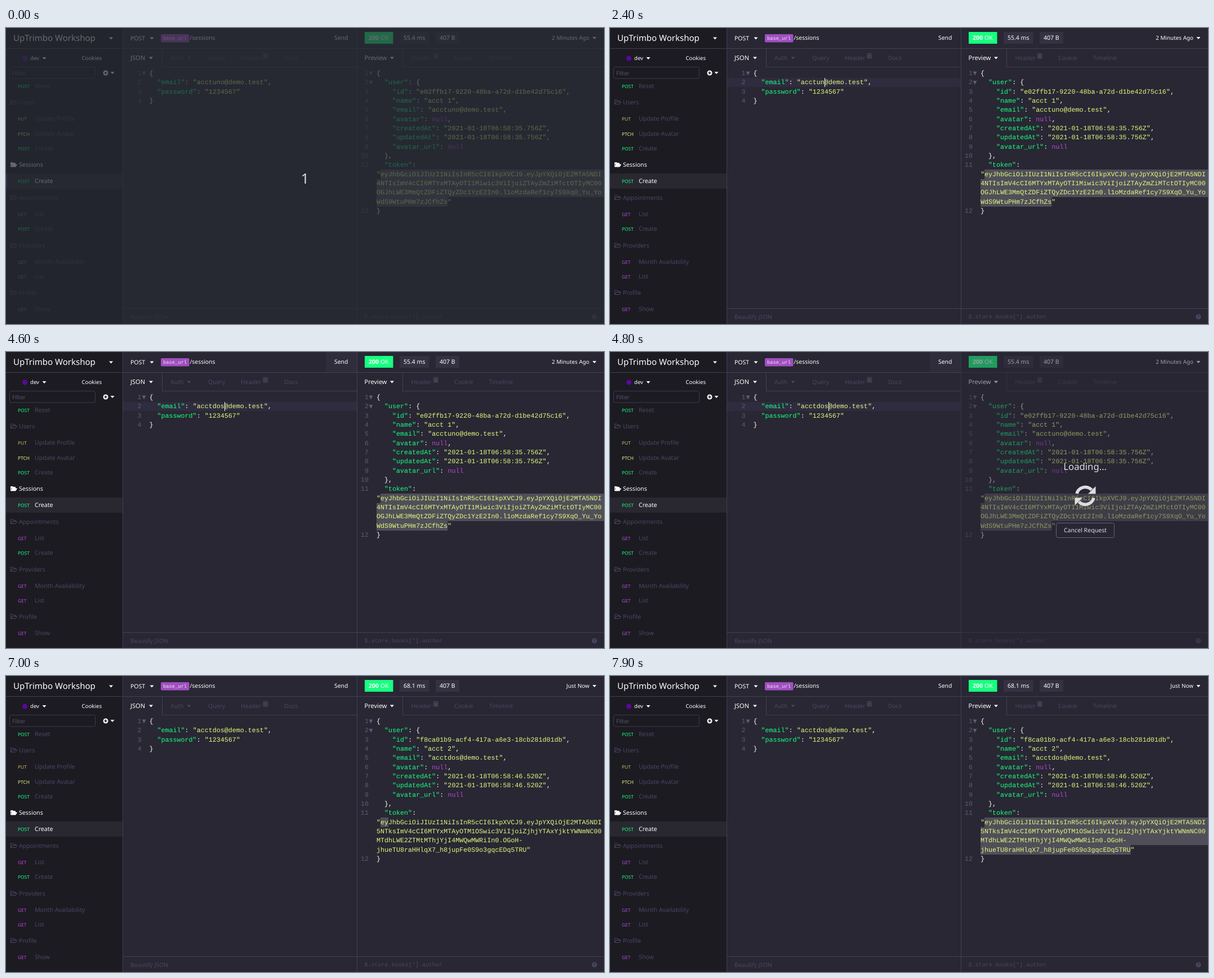
Recreate the animation shown at these times as an HTML page with a canvas. Size 1062 by 527 pixels, loop 8000 ms.

```html
<!DOCTYPE html>
<html lang="en">
<head>
<meta charset="utf-8">
<title>API client</title>
<style>
html, body { margin: 0; width: 100%; height: 100%; overflow: hidden; background: #282733; }
canvas { display: block; }
</style>
</head>
<body>
<canvas id="stage" width="1062" height="527"></canvas>
<script>
const ctx = document.getElementById('stage').getContext('2d');
const W = 1062, H = 527, LOOP = 8000, STEP = 100;
const SANS = '"Noto Sans", "Open Sans", sans-serif';
const MONO = '"Liberation Mono", "DejaVu Sans Mono", monospace';
const CHAR = 7.021, LINE = 16.36, ROW_TOP = 72.3;
const REQ_X = 254.4, RES_X = 658;
const C = {
  bg: '#282733', side: '#1c1b22', line: '#423f54', active: '#292831',
  muted: '#4a4763', gutter: '#5f5c78', white: '#ffffff', tag: '#343242',
  green: '#17ff80', yellow: '#e2fb80', purple: '#b548d6', gold: '#cdb85f'
};
const METHOD = { POST: C.green, PUT: C.gold, PTCH: C.yellow, GET: C.purple };

const SIDEBAR = [
  [103, 'POST', 'Reset'], [132, '', 'Users'],
  [161, 'PUT', 'Update Profile'], [188, 'PTCH', 'Update Avatar'],
  [214.5, 'POST', 'Create'], [243.5, '', 'Sessions', true],
  [272.5, 'POST', 'Create', true], [302, '', 'Appointments'],
  [331, 'GET', 'List'], [357.5, 'POST', 'Create'],
  [387, '', 'Providers'], [416, 'GET', 'Month Availability'],
  [442.5, 'GET', 'List'], [471, '', 'Profile'], [500.5, 'GET', 'Show']
];

function response(id, num, word, stamp, token) {
  return ['{', '  "user": {',
    `    "id": "${id}",`,
    `    "name": "acct ${num}",`,
    `    "email": "acct${word}@demo.test",`,
    '    "avatar": null,',
    `    "createdAt": "${stamp}",`,
    `    "updatedAt": "${stamp}",`,
    '    "avatar_url": null', '  },', '  "token":', ...token, '}'];
}

const OLD = response('e02ffb17-9220-48ba-a72d-d1be42d75c16', 1, 'uno', '2021-01-18T06:58:35.756Z', [
  '"eyJhbGciOiJIUzI1NiIsInR5cCI6IkpXVCJ9.eyJpYXQiOjE2MTA5NDI',
  '4NTIsImV4cCI6MTYxMTAyOTI1Miwic3ViIjoiZTAyZmZiMTctOTIyMC00',
  'OGJhLWE3MmQtZDFiZTQyZDc1YzE2In0.l1oMzdaRef1cy7S9XqO_Yu_Yo',
  'WdS9WtuPHm7zJCfhZs"']);
const NEW = response('f8ca01b9-acf4-417a-a6e3-18cb281d01db', 2, 'dos', '2021-01-18T06:58:46.520Z', [
  '"eyJhbGciOiJIUzI1NiIsInR5cCI6IkpXVCJ9.eyJpYXQiOjE2MTA5NDI',
  '5NTksImV4cCI6MTYxMTAyOTM1OSwic3ViIjoiZjhjYTAxYjktYWNmNC00',
  'MTdhLWE2ZTMtMThjYjI4MWQwMWRiIn0.OGoH-',
  'jhueTU8raHHlqX7_h8jupFe0S9o3gqcEDq5TRU"']);

// [start, value] steps
const TYPED = [[0, 'uno'], [2400, 'un'], [2600, 'u'], [3000, ''], [3100, 'd'], [3200, 'do'], [3300, 'dos']];
const BLINK = [[0, 0], [1000, 1], [4000, 0], [4500, 1], [5000, 0], [5500, 1], [6000, 0], [6600, 1], [6900, 0]];
const SELECT = [[0, [14, 18]], [5200, null], [7000, [11, 3]], [7100, [11, 12]], [7200, [12, 22]],
  [7300, [13, 30]], [7400, [14, 35]], [7500, [14, 39]], [7900, [14, 38]]];

function at(steps, t) {
  let value;
  for (const [start, v] of steps) if (t >= start) value = v;
  return value;
}

function rect(x, y, w, h, color, r = 0) {
  ctx.fillStyle = color;
  ctx.beginPath();
  ctx.roundRect(x, y, w, h, r);
  ctx.fill();
}

function frame(x, y, w, h, color) {
  ctx.strokeStyle = color;
  ctx.lineWidth = 1;
  ctx.beginPath();
  ctx.roundRect(x, y, w, h, 3);
  ctx.stroke();
}

function disc(x, y, r, color) {
  ctx.fillStyle = color;
  ctx.beginPath();
  ctx.arc(x, y, r, 0, 7);
  ctx.fill();
}

function poly(color, ...pts) {
  ctx.fillStyle = color;
  ctx.beginPath();
  for (const [x, y] of pts) ctx.lineTo(x, y);
  ctx.fill();
}

function text(s, x, y, color = C.white, size = 10.5, align = 'left', family = SANS, weight = '') {
  ctx.font = `${weight} ${size}px ${family}`;
  ctx.textAlign = align;
  ctx.fillStyle = color;
  ctx.fillText(s, x, y);
}

function caret(x, y, color = C.white) {
  poly(color, [x - 3.5, y - 2], [x + 3.5, y - 2], [x, y + 2]);
}

function fold(x, row) {
  const y = ROW_TOP + LINE * row + 8.5;
  poly(C.gutter, [x - 3.5, y - 3.2], [x + 3.5, y - 3.2], [x, y + 3.8]);
}

function folder(y, open) {
  const color = open ? C.white : C.muted;
  ctx.strokeStyle = color;
  ctx.lineWidth = 1;
  ctx.lineJoin = 'round';
  ctx.beginPath();
  for (const [x, dy] of [[8.5, 3.5], [8.5, -4], [12, -4], [13, -2.5], [16.5, -2.5], [16.5, -0.5]]) ctx.lineTo(x, y + dy);
  ctx.stroke();
  if (open) rect(8.5, y - 3.5, 8, 3, color);
  ctx.beginPath();
  for (const [x, dy] of [[8.5, 3.5], [11, -0.5], [19.5, -0.5], [17, 3.5]]) ctx.lineTo(x, y + dy);
  ctx.closePath();
  if (open) { ctx.fillStyle = color; ctx.fill(); }
  ctx.stroke();
}

function codeLine(s, x, row) {
  const y = ROW_TOP + LINE * row + 11.5;
  const parts = /^[^ {}]/.test(s) ? [s] : s.match(/"[^"]*"(:?)|null|[^"n]+/g);
  let col = 0;
  for (const part of parts) {
    const key = part.endsWith('":');
    const body = key ? part.slice(0, -1) : part;
    const color = key ? C.green : part === 'null' ? C.purple : /^[ {},:]+$/.test(part) ? C.white : C.yellow;
    text(body, x + col * CHAR, y, color, 11.7, 'left', MONO);
    if (key) text(':', x + (col + body.length) * CHAR, y, C.white, 11.7, 'left', MONO);
    col += part.length;
  }
}

function lineNo(n, x, row) {
  text(n, x, ROW_TOP + LINE * row + 11.5, C.gutter, 11.7, 'right', MONO);
}

function badge(x, s) {
  rect(x, 44.5, 9.5, 10.5, '#3b394b', 1.5);
  text(s, x + 4.75, 52.5, '#5d5a75', 7.5, 'center');
}

function drawSidebar(t) {
  rect(0, 0, 207, H, C.side);
  text('UpTrimbo Workshop', 13, 22.5, C.white, 15);
  caret(186.5, 18.5);
  disc(33.5, 54, 4.5, '#5a08a0');
  text('dev', 43, 57, C.white, 9.6);
  caret(68, 54);
  text('Cookies', 134.5, 57, C.white, 9.7);
  frame(6.5, 69.5, 152, 20.5, '#3c3a4a');
  text('Filter', 11, 83.5, '#55536a', 10);
  disc(177, 80, 4.5, C.white);
  rect(174.5, 79.25, 5, 1.5, C.side);
  rect(176.25, 77.5, 1.5, 5, C.side);
  caret(189, 80);
  rect(0, 259, 207, 27, C.active);
  if (t < 1100) rect(0, 259, 1.5, 27, '#8a3fb0');
  for (const [y, method, name, on] of SIDEBAR) {
    const color = on ? C.white : C.muted;
    if (method) text(method, 21, y + 3.5, METHOD[method], 8.4);
    else folder(y, on);
    text(name, method ? 51 : 23, y + 3.5, color, 10.6);
  }
}

function drawRequest(t) {
  if (t >= 4500 && t < 6900) rect(568, 0, 55, 36, '#2f2d3c');
  text('POST', 221, 21.5);
  caret(259, 18.5);
  rect(275, 11, 50.5, 14.5, '#a04fc0', 2);
  text('base_url', 279, 20.5, '#f3e2fa', 8.75, 'left', MONO);
  text('/sessions', 326.5, 21, C.white, 10.4);
  text('Send', 583, 21, C.white, 10.4);
  text('JSON', 221, 57, C.white, 11);
  caret(257.5, 53.5);
  text('Auth', 292, 57, C.muted);
  caret(325, 53.5, C.muted);
  text('Query', 359, 57, C.muted);
  text('Header', 417, 57, C.muted);
  badge(456, '1');
  text('Docs', 494, 57, C.muted);

  if (t >= 1000 && t < 6900) rect(208, 89, 415, 16, '#2f2c3f');
  const user = 'acct' + at(TYPED, t);
  ['{', `  "email": "${user}@demo.test",`, '  "password": "1234567"', '}'].forEach((s, i) => {
    codeLine(s, REQ_X, i);
    lineNo(i + 1, 240.5, i);
  });
  fold(245, 0);
  if (at(BLINK, t)) {
    const col = t < 1800 ? 18 : t < 1900 ? 21 : 12 + user.length;
    rect(Math.round(REQ_X + col * CHAR), 89, 1, 16, C.white);
  }
  text('Beautify JSON', 221, 517.5, C.muted, 10.3);
}

function drawResponse(t) {
  const fresh = t >= 5200;
  rect(637, 7, 50.5, 21, C.green);
  text('200', 644, 21, C.white, 10.5, 'left', SANS, 'bold');
  text('OK', 665, 21);
  rect(699, 7, 52.5, 21, C.tag);
  text(fresh ? '68.1 ms' : '55.4 ms', 706, 21);
  rect(763, 7, 42, 21, C.tag);
  text('407 B', 770, 21);
  text(fresh ? 'Just Now' : '2 Minutes Ago', 1036, 21, C.white, 9.9, 'right');
  caret(1045, 18);
  text('Preview', 636.5, 57, C.white, 11);
  caret(685.5, 53.5);
  text('Header', 719.5, 57, C.muted);
  badge(758.5, '6');
  text('Cookie', 796, 57, C.muted);
  text('Timeline', 858, 57, C.muted);

  const sel = at(SELECT, t);
  if (sel) {
    for (let r = 11; r <= sel[0]; r++) {
      const x = RES_X + (r === 11 ? CHAR : 0);
      const end = r < sel[0] ? W : RES_X + sel[1] * CHAR;
      const y = Math.round(ROW_TOP + LINE * r);
      rect(x, y, end - x, Math.round(ROW_TOP + LINE * (r + 1)) - y, '#504f59');
    }
  }
  (fresh ? NEW : OLD).forEach((s, i) => {
    codeLine(s, RES_X, i);
    if (i < 11 || i === 15) lineNo(i < 11 ? i + 1 : 12, 644, i);
  });
  fold(648, 0);
  if (!fresh || t >= 5700) fold(648, 1);
  text('$.store.books[*].author', 636.5, 516.5, C.muted, 10.07, 'left', MONO);
  disc(1045, 514, 4.5, C.muted);
  text('?', 1045, 517, C.bg, 8, 'center', SANS, 'bold');
}

function drawLines() {
  const l = (x, y, w, h) => rect(x, y, w, h, C.line);
  l(0, 36, W, 1);
  l(207, 0, 1, H);
  l(623, 0, 1, H);
  l(277, 37, 1, 32);
  l(277, 69, 346, 1);
  l(704, 37, 1, 32);
  l(704, 69, W - 704, 1);
  l(208, 499, W - 208, 1);
}

function drawLoading(t) {
  const ink = '#dddde0';
  rect(623, 0, W - 623, H, 'rgba(40,39,51,.45)');
  text('Loading...', 843.7, 210, ink, 16.7, 'center');
  ctx.save();
  ctx.translate(844, 256);
  ctx.rotate((t - 4800) / 2000 * Math.PI * 2);
  for (let i = 0; i < 2; i++) {
    ctx.strokeStyle = ink;
    ctx.lineWidth = 5.5;
    ctx.beginPath();
    ctx.arc(0, 0, 15.5, Math.PI * 1.08, Math.PI * 1.76);
    ctx.stroke();
    poly(ink, [18.5, -17], [18.5, -3.5], [5, -3.5]);
    ctx.rotate(Math.PI);
  }
  ctx.restore();
  frame(792.5, 304.5, 103, 26, '#65627a');
  text('Cancel Request', 844, 321, ink, 10.6, 'center');
}

function drawCountdown() {
  rect(0, 0, W, H, 'rgba(38,42,50,.7)');
  text('1', 531, 277, '#dcdce0', 25, 'center');
}

function draw(t) {
  ctx.textRendering = 'geometricPrecision';
  rect(0, 0, W, H, C.bg);
  drawSidebar(t);
  drawRequest(t);
  drawResponse(t);
  drawLines();
  if (t >= 4800 && t < 5200) drawLoading(t);
  if (t < 100) drawCountdown();
}

const begin = performance.now();
function tick() {
  const t = (performance.now() - begin) % LOOP;
  draw(Math.floor(t / STEP) * STEP);
  requestAnimationFrame(tick);
}
tick();
</script>
</body>
</html>
```
